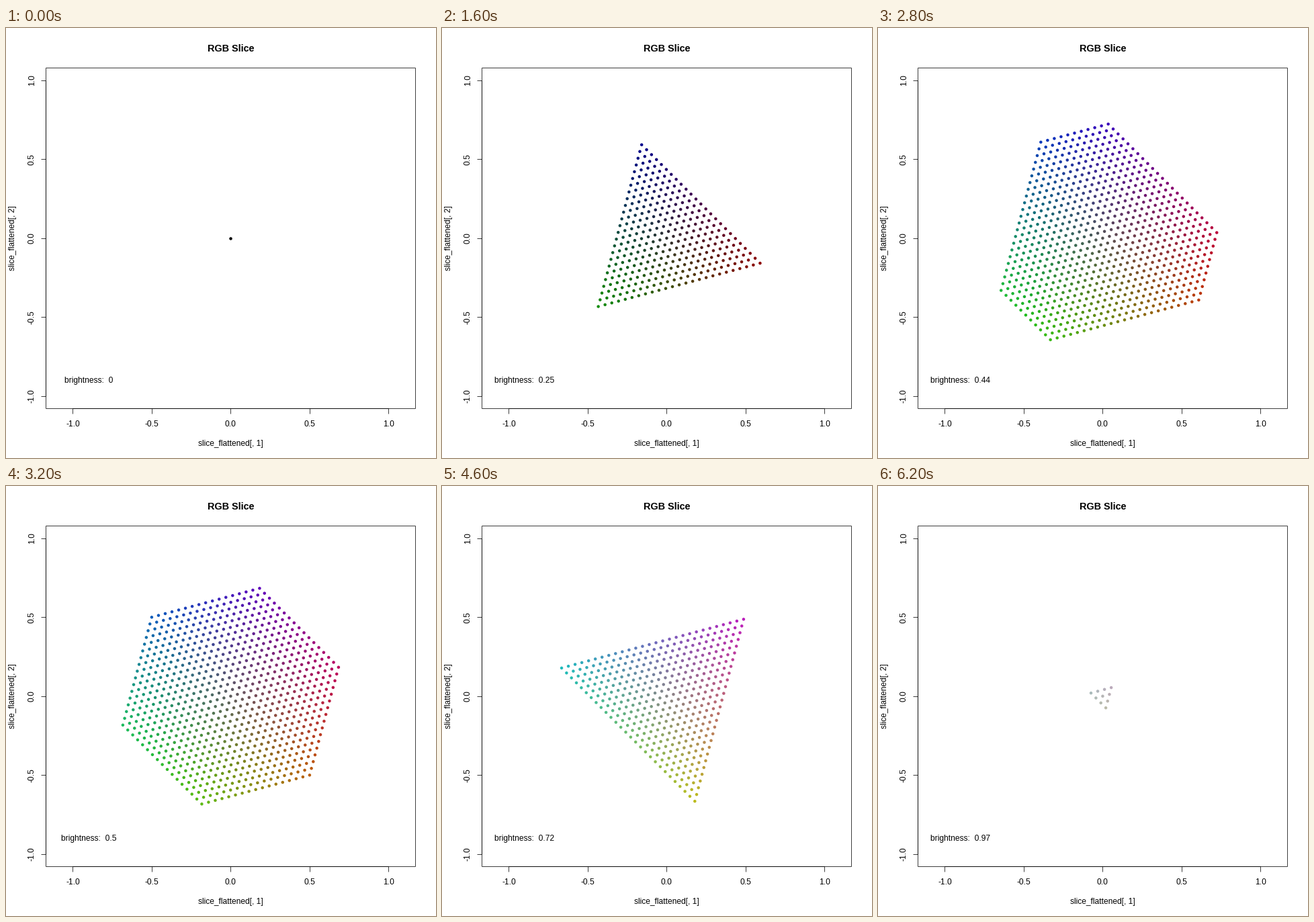
A matplotlib script for the animation above (6.3 s loop, 640x640 px).

```python
import numpy as np
import matplotlib.pyplot as plt
from matplotlib.animation import FuncAnimation

SIZE = 640
FRAMES = 63
LEVELS = 32                 # grid steps along one colour axis
CX, CY, UNIT = 334.4, 312.8, 235
LEFT, RIGHT, TOP, BOTTOM = 59.0, 609.4, 59.0, 566.4
TICK = 7.2

plt.rcParams["font.family"] = "Liberation Sans"

# Directions of the red, green and blue axes seen along the grey diagonal
ANGLES = np.radians([-15, 225, 105])
AXES = np.sqrt(2 / 3) * np.column_stack([np.cos(ANGLES), np.sin(ANGLES)])

fig = plt.figure(figsize=(SIZE / 72, SIZE / 72), dpi=72, facecolor="white")
ax = fig.add_axes([0, 0, 1, 1])
ax.set_xlim(0, SIZE)
ax.set_ylim(SIZE, 0)
ax.axis("off")


def line(xs, ys):
    ax.plot(xs, ys, color="black", lw=0.75, solid_capstyle="butt")


def label(x, y, text, size=12, **kw):
    return ax.text(x, y, text, fontsize=size, ha="center", va="baseline",
                   rotation_mode="anchor", **kw)


def draw_axes():
    line([LEFT, RIGHT], [TOP, TOP])
    line([LEFT, RIGHT], [BOTTOM, BOTTOM])
    line([LEFT, LEFT], [TOP, BOTTOM])
    line([RIGHT, RIGHT], [TOP, BOTTOM])
    line([CX - UNIT, CX + UNIT], [BOTTOM, BOTTOM])
    line([LEFT, LEFT], [CY - UNIT, CY + UNIT])
    for v in (-1, -0.5, 0, 0.5, 1):
        x, y = CX + UNIT * v, CY - UNIT * v
        line([x, x], [BOTTOM, BOTTOM + TICK])
        line([LEFT - TICK, LEFT], [y, y])
        name = f"{v:.1f}".replace("-", "-")
        label(x, 593, name)
        label(42, y, name, rotation=90)
    label(CX, 35, "RGB Slice", 14.4, weight="bold")
    label(CX, 622, "slice_flattened[, 1]")
    label(13, CY, "slice_flattened[, 2]", rotation=90)


def cube_slice(brightness):
    """Colours inside the unit cube whose mean is the given brightness."""
    steps = np.arange(LEVELS + 1) / LEVELS
    r, g = (a.ravel() for a in np.meshgrid(steps, steps))
    b = 3 * brightness - r - g
    inside = (b >= 0) & (b <= 1)
    return np.column_stack([r, g, b])[inside]


def shade(rgb):
    """Muted display colours; green bleeds a little into red and blue."""
    r, g, b = rgb.T
    return 0.735 * np.column_stack(
        [np.maximum(r, 0.16 * g), g, np.maximum(b, 0.11 * g)])


draw_axes()
caption = label(CX - 0.9 * UNIT, 528, "")
dots = ax.scatter([], [], s=4.5 ** 2, linewidths=0, zorder=3)


def update(i):
    brightness = i / 64
    rgb = cube_slice(brightness)
    flat = rgb @ AXES
    dots.set_offsets(np.array([CX, CY]) + flat * [UNIT, -UNIT])
    dots.set_facecolors(shade(rgb))
    caption.set_text(f"brightness:  {round(brightness, 2):g}")
    return dots, caption


anim = FuncAnimation(fig, update, frames=FRAMES, interval=100,
                     repeat=True, repeat_delay=0)
plt.show()
```
